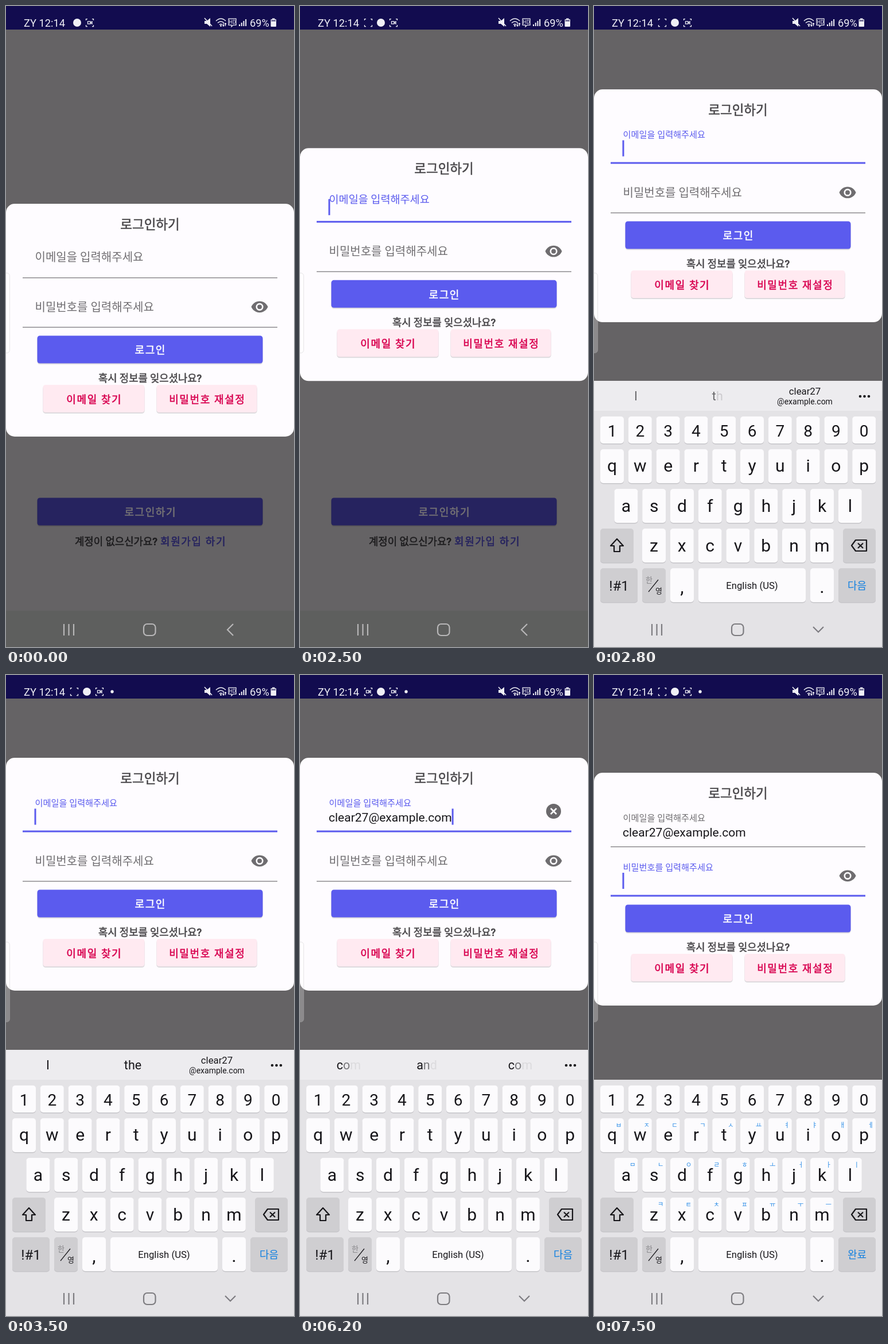
An HTML page for the animation above (8 s loop, 502 by 1115 pixels).

```html
<!DOCTYPE html>
<html lang="ko">
<head>
<meta charset="utf-8">
<style>
html, body { margin: 0; width: 100%; height: 100%; overflow: hidden; background: #656365; }
svg { display: block; width: 502px; height: 1115px; font-family: Roboto, "Noto Sans CJK KR", "Noto Sans CJK", sans-serif; }
text { white-space: pre; }
.mid { text-anchor: middle; }
.bold { font-weight: 500; stroke-width: .55px; }
.wide { letter-spacing: 1.6px; }
.line { fill: none; stroke: currentColor; stroke-width: 2.2; }
.thin { stroke-width: 1.25; }
</style>
</head>
<body>
<svg id="stage" viewBox="0 0 502 1115"></svg>
<script>
const BLUE = '#5b5bee', GREY = '#6f6d70', INK = '#17161a', TITLE = '#49474a';

// Drawing helpers: text is placed by its vertical centre.
const baseline = (cy, size, str) => cy + size * (/[가-힣]/.test(str) ? .4 : .36);
const text = (x, cy, size, str, fill, cls = '', id = '') =>
  `<text id="${id}" class="${cls}" x="${x}" y="${baseline(cy, size, str)}" font-size="${size}" fill="${fill}"` +
  `${/bold/.test(cls) ? ` stroke="${fill}"` : ''}>${str}</text>`;
const rect = (x, y, w, h, fill, r = 0, more = '') =>
  `<rect x="${x}" y="${y}" width="${w}" height="${h}" rx="${r}" fill="${fill}" ${more}/>`;
const line = (d, cls = '', more = '') => `<path class="line ${cls}" d="${d}" ${more}/>`;
const group = (id, body, more = '') => `<g id="${id}" ${more}>${body}</g>`;

const button = (x, y, w, fill, label, color) =>
  rect(x - .5, y + 2, w + 1, 47.5, '#000', 4.5, 'opacity=".1"') + rect(x - 1, y + .5, w + 2, 48, '#000', 5, 'opacity=".06"') +
  rect(x - .5, y - .5, w + 1, 48, fill, 4.5) + text(x + w / 2 + .8, y + 24, 18, label, color, 'mid bold wide');

// Status bar
const frameIcon = (id, cam) => group(id,
  line('M-6.5-4V-6.5H-4M4-6.5H6.5V-4M6.5 4V6.5H4M-4 6.5H-6.5V4', 'thin') +
  group(cam, line('M-3.5-2.2H1V2.2H-3.5ZM1 0L4-2V2Z', 'thin')));

const statusBar = rect(0, 0, 502, 41, '#120c4f') + `<g color="#f0f0f6">` +
  text(31, 29, 18.3, 'ZY 12:14', '#f0f0f6') +
  frameIcon('recorder', 'recCam') + frameIcon('shot', 'shotCam') +
  '<circle id="badge" r="7" cy="29" fill="#f0f0f6"/><circle id="dot" cx="185" cy="29" r="2.7" fill="#f0f0f6"/>' +
  '<path d="M346 26h4l6-5v15l-6-5h-4z" fill="#f0f0f6"/>' +
  line('M346 21L359 35M366 26Q374.5 18 383 26M369 29.5Q374.5 24.5 380 29.5M372 32.5Q374.5 30.5 377 32.5', '', 'style="stroke-width:1.6"') +
  '<circle cx="374.5" cy="34.5" r="1.4" fill="#f0f0f6"/>' +
  line('M379 30V35M377.5 33.5L379 35L380.5 33.5M382.5 35V30M381 31.5L382.5 30L384 31.5', 'thin') +
  line('M389 22H401V33H396L393 36V33H388V22Z', 'thin') +
  text(394.7, 27.6, 8.5, 'HD', '#f0f0f6', 'mid') +
  [0, 1, 2, 3].map(i => rect(406 + i * 3.7, 32 - i * 3, 2, 3 + i * 3, '#f0f0f6')).join('') +
  text(425, 29, 18.3, '69%', '#f0f0f6') +
  rect(464, 21.5, 4.5, 2, '#f0f0f6') + rect(461.5, 23, 9.5, 13, '#f0f0f6', 1) + rect(462.5, 24, 7.5, 3, '#77749a') + '</g>';

// Navigation bar
const navIcons = (id, color, back) => group(id,
  line('M101 1075V1095M109.5 1075V1095M118 1075V1095') +
  rect(240, 1075, 20.5, 20, 'none', 6, 'class="line"') + line(back), `color="${color}"`);

// Login sheet, relative to its top edge
const sheet = group('sheet',
  rect(0, 0, 502, 405, '#fefcff', 15) + text(251, 35, 22.5, '로그인하기', TITLE, 'mid bold') +
  text(50.5, 92, 20, '이메일을 입력해주세요', GREY, '', 'mailLabel') +
  text(50.5, 179, 20, '비밀번호를 입력해주세요', GREY, '', 'passLabel') +
  text(50, 103, 21, 'clear27@example.com', INK, '', 'mail') +
  '<rect id="mailLine" x="29" width="444"/><rect id="passLine" x="29" width="444"/>' +
  `<rect id="cursor" width="3" height="28" fill="${BLUE}"/>` +
  group('clear', '<circle cx="442" cy="93" r="13" fill="#6b696c"/>' +
    '<path d="M437 88L447 98M447 88L437 98" stroke="#fff" stroke-width="2.6"/>') +
  `<path transform="translate(426.2 163.5) scale(1.32)" fill="${GREY}" fill-rule="evenodd" d="M12 4.5C7 4.5 2.73 7.61 1 12c1.73 4.39 6 7.5 11 7.5s9.27-3.11 11-7.5c-1.73-4.39-6-7.5-11-7.5zM12 17a5 5 0 1 1 0-10a5 5 0 0 1 0 10zM12 9a3 3 0 1 0 0 6a3 3 0 0 0 0-6z"/>` +
  button(55, 230, 392, BLUE, '로그인', '#fff') +
  text(251, 303, 17.7, '혹시 정보를 잊으셨나요?', TITLE, 'mid bold') +
  button(65, 315.5, 176, '#ffeaf1', '이메일 찾기', '#d8004f') +
  button(263, 315.5, 174, '#ffeaf1', '비밀번호 재설정', '#d8004f'));

// Keyboard
const PITCH = 48.8, KEY = 41, DARK = '#cfced1';
const key = (x, y, w, h, fill = '#fcfbfd', id = '') =>
  rect(x, y + 1.5, w, h, '#c6c5c9', 5) + rect(x, y, w, h, fill, 5, `id="${id}"`);
let hints = '';
const keyRow = (x0, y, h, letters, size, base, jamo = '') => [...letters].map((ch, i) => {
  const x = x0 + i * PITCH;
  if (jamo) hints += text(x + 32, y + 12, 11.5, jamo[i], '#2f8fe8', 'mid');
  return key(x, y, KEY, h) + `<text class="mid" x="${x + KEY / 2}" y="${base}" font-size="${size}" fill="${INK}">${ch}</text>`;
}).join('');
const word = (cx, str, set) =>
  `<text class="mid" x="${cx}" y="686" font-size="21.5" fill="${INK}">` +
  [...str].map((c, i) => `<tspan class="${set}" data-i="${i}">${c}</tspan>`).join('') + '</text>';

const keys =
  keyRow(11, 714, 47, '1234567890', 28, 749) +
  keyRow(11, 771, 59, 'qwertyuiop', 30, 810, 'ㅂㅈㄷㄱㅅㅛㅕㅑㅐㅔ') +
  keyRow(35.4, 840, 59, 'asdfghjkl', 30, 880, 'ㅁㄴㅇㄹㅎㅗㅓㅏㅣ') +
  keyRow(84, 909, 59, 'zxcvbnm', 30, 949, 'ㅋㅌㅊㅍㅠㅜㅡ') +
  key(11, 909, 58, 59, DARK) + key(434, 909, 57, 59, DARK, 'erase') +
  key(11, 978, 65, 59, DARK) + key(84, 978, KEY, 59, DARK) + keyRow(133, 978, 59, ',', 32, 1021) +
  key(182, 978, 187, 59) + keyRow(377, 978, 59, '.', 32, 1021) + key(426, 978, 65, 59, DARK) +
  `<g color="${INK}">` + line('M40 927L51 939H45V949H35V939H29Z', '', 'stroke-linejoin="round"') +
  line('M456 929H475V948H456L449 938.5ZM460 934.5L469 943M469 934.5L460 943', '', 'stroke-linejoin="round"') +
  line('M95 1019L112 998', 'thin') + '</g>' +
  text(43.5, 1008, 24, '!#1', INK, 'mid') + text(96, 998, 13, '한', '#87868a', 'mid') + text(113, 1017, 13, '영', INK, 'mid') +
  text(275.5, 1008, 16.7, 'English (US)', INK, 'mid') + text(458.5, 1008, 18, '다음', '#1280e0', 'mid', 'action');

const keyboard = group('keyboard',
  group('bar', rect(0, 652, 502, 52.5, '#edecef') +
    [464, 471.5, 479].map(x => `<circle cx="${x}" cy="679" r="2.3" fill="${INK}"/>`).join('') +
    word(73, 'I', 'first') + word(221, 'the', 'first') +
    group('offer', text(367.5, 670, 16.8, 'clear27', INK, 'mid') + text(367.5, 688, 14, '@example.com', INK, 'mid')) +
    word(85, 'com', 'second') + word(221, 'and', 'second') + word(384, 'com', 'second')) +
  rect(0, 704, 502, 411, '#e4e3e6') + keys + group('hints', hints));

const stage = document.getElementById('stage');
stage.innerHTML = rect(0, 0, 502, 1115, '#656365') +
  button(55, 856, 392, '#26235f', '로그인하기', '#747274') +
  text(120, 931, 17.8, '계정이 없으신가요?', '#1d1c1e', 'bold') +
  text(269, 931, 18, '회원가입 하기', '#26235f', 'bold wide') +
  rect(0, 1052, 502, 63, '#5e5f5e') + statusBar + sheet +
  rect(-10, 464.5, 16.5, 139, '#fff', 5, 'fill-opacity=".25" stroke="#bbb" stroke-opacity=".35"') +
  keyboard + navIcons('navLight', '#b8b7b8', 'M396 1075L386 1085L396 1095') +
  navIcons('navDark', '#7d7c80', 'M382 1080L391 1089L400 1080');

const $ = id => document.getElementById(id);
const set = (id, attrs) => { for (const k in attrs) $(id).setAttribute(k, attrs[k]); };
const ramp = (t, a, b) => Math.min(1, Math.max(0, (t - a) / (b - a)));
const out = p => 1 - (1 - p) ** 2;
const mix = (a, b, p) => a + (b - a) * p;
const mailWidth = $('mail').getComputedTextLength();

const STEP = 100, MAIL_FOCUS = 2450, FILL = 4700, ERASE = 5900, PASS_FOCUS = 6500, PLAIN_KEYS = 6600;

function field(name, lineY, active, floatP, y0, y1) {
  const size = mix(20, 15.2, floatP), label = name + 'Label';
  set(label, { 'font-size': size, y: baseline(mix(y0, y1, floatP), size, $(label).textContent), fill: active ? BLUE : GREY });
  set(name + 'Line', { y: active ? lineY - 2 : lineY - .5, height: active ? 3 : 1.5, fill: active ? BLUE : '#8e8c8f' });
}

function draw(t) {
  // Status icons: the recorder slides in, then blinks once a second
  const slide = out(ramp(t, 50, 300)), beat = t % 1000;
  set('recorder', { transform: 'translate(119 29)', opacity: slide });
  set('recCam', { opacity: beat < 900 ? 1 - ramp(beat, 400, 500) : ramp(beat, 800, 1000) });
  set('badge', { cx: mix(124, 141, slide) });
  set('shot', { transform: `translate(${mix(146, 163, slide)} 29)` });
  set('dot', { opacity: ramp(t, 2950, 3100) });

  const onMail = t >= MAIL_FOCUS && t < PASS_FOCUS, onPass = t >= PASS_FOCUS, filled = t >= FILL;
  const y = 344 - 174 * out(ramp(t, MAIL_FOCUS, 2600)) - 26 * out(ramp(t, 2600, 2850)) + 26 * out(ramp(t, PLAIN_KEYS - 50, 6720));
  set('sheet', { transform: `translate(0 ${y})` });
  field('mail', 128.5, onMail, ramp(t, MAIL_FOCUS, 2617), 92, 78);
  field('pass', 214.5, onPass, ramp(t, PASS_FOCUS, 6667), 179, 164);
  set('mail', { opacity: +filled });
  set('clear', { opacity: ramp(t, 4650, 4800) - ramp(t, PASS_FOCUS, 6600) });

  const since = [MAIL_FOCUS, FILL, ERASE, PASS_FOCUS].filter(s => s <= t).pop();
  set('cursor', {
    x: onMail && filled ? 50 + mailWidth + (t < ERASE ? 5 : 0) : 49.5,
    y: onPass ? 174 : 88.5,
    opacity: since && Math.floor((t - since) / 500) % 2 === 0 ? 1 : 0
  });

  const shown = ramp(t, 2500, 2765);
  const drop = 228 * (1 - ramp(t, 2600, 2800)) ** 2 + 150 * (1 - ramp(t, 2500, 2600));
  set('keyboard', { transform: `translate(0 ${drop})`, opacity: shown });
  set('navLight', { opacity: 1 - shown });
  set('navDark', { opacity: ramp(shown, .5, 1) });
  set('bar', { opacity: +(t < PLAIN_KEYS) });
  set('hints', { opacity: +(t >= PLAIN_KEYS) });
  set('offer', { opacity: ramp(t, 2700, 2790) * !filled });
  set('erase', { fill: t >= ERASE && t < ERASE + STEP ? '#b2b1b5' : DARK });
  $('action').textContent = t < PLAIN_KEYS ? '다음' : '완료';
  for (const s of document.querySelectorAll('.first, .second')) {
    const early = s.classList.contains('first'), from = (early ? 2720 : 6070) + s.dataset.i * 60;
    s.setAttribute('fill-opacity', ramp(t, from, from + 130) * (!early || t < 6100));
  }
}

const begin = performance.now();
(function tick() {
  const now = performance.now() - begin + 10;
  draw(Math.floor(now / STEP) * STEP % 8000);
  requestAnimationFrame(tick);
})();
</script>
</body>
</html>
```
